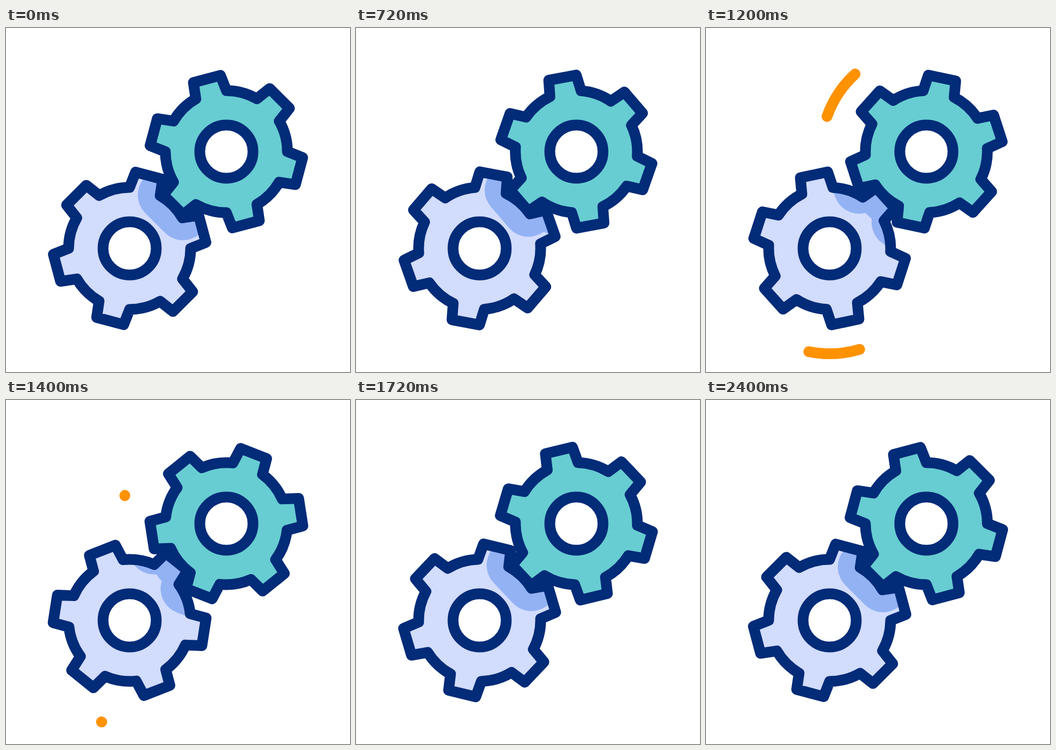
An HTML page without scripts that plays this animation: 640 px wide and 640 px high, repeating every 2.52 s.

```html
<!DOCTYPE html>
<html lang="en">
<head>
<meta charset="utf-8">
<title>Gears</title>
<style>
  @property --turn { syntax: "<number>"; inherits: true; initial-value: 15; }
  @property --head { syntax: "<number>"; inherits: true; initial-value: 0; }
  @property --tail { syntax: "<number>"; inherits: true; initial-value: 0; }

  html, body { margin: 0; height: 100%; overflow: hidden; background: #fff; }

  svg {
    display: block;
    width: 100%;
    height: 100%;
    animation: 2520ms infinite;
    animation-name: turn, head, tail;
    animation-timing-function: cubic-bezier(.73, -.32, .25, 1.3), cubic-bezier(.49, 0, .51, 1), cubic-bezier(.49, 0, .51, 1);
  }

  .line { fill: none; stroke: #022b78; stroke-width: 20; stroke-linejoin: round; }
  .hub { fill: #fff; }
  .shade { fill: #93b2f4; stroke: #93b2f4; stroke-width: 95; stroke-linejoin: round; }

  .cw { transform: rotate(calc(var(--turn) * 1deg)); }
  .ccw { transform: rotate(calc(var(--turn) * -1deg)); }
  /* cancels the lower gear's spin, then follows the upper gear */
  .follow {
    transform: rotate(calc(var(--turn) * -1deg)) translate(180px, -180px) rotate(calc(var(--turn) * -1deg));
  }

  .swoosh {
    fill: none;
    stroke: #ff9200;
    stroke-width: 20;
    stroke-linecap: round;
    stroke-dasharray: calc((var(--head) - var(--tail) + .1) * 1px) 300px;
    stroke-dashoffset: calc(var(--tail) * -1px);
    visibility: hidden;
    animation: show 2520ms step-end infinite;
  }

  /* a third of a turn; the easing winds up first and overshoots */
  @keyframes turn {
    0%, 9.524% { --turn: 15; }
    95.238%, 100% { --turn: 135; }
  }
  @keyframes head {
    0%, 31.746% { --head: 0; }
    50.794%, 100% { --head: 99.9; }
  }
  @keyframes tail {
    0%, 36.508% { --tail: 0; }
    55.556%, 100% { --tail: 99.8; }
  }
  @keyframes show {
    0% { visibility: hidden; }
    31.74% { visibility: visible; }
    57.14%, 100% { visibility: hidden; }
  }
</style>
</head>
<body>
<svg viewBox="0 0 640 640">
  <defs>
    <path id="gear" d="M-29.5-109.6L-26-140L26-140L29.5-109.6
      A113.5 113.5 0 0 1 80.2-80.3L108.2-92.5L134.2-47.5L109.7-29.3
      A113.5 113.5 0 0 1 109.7 29.3L134.2 47.5L108.2 92.5L80.2 80.3
      A113.5 113.5 0 0 1 29.5 109.6L26 140L-26 140L-29.5 109.6
      A113.5 113.5 0 0 1 -80.2 80.3L-108.2 92.5L-134.2 47.5L-109.7 29.3
      A113.5 113.5 0 0 1 -109.7-29.3L-134.2-47.5L-108.2-92.5L-80.2-80.3
      A113.5 113.5 0 0 1 -29.5-109.6Z"/>
    <path id="arc" pathLength="100" d="M67-184.2A196 196 0 0 0 -189-52"/>
    <clipPath id="inside"><use href="#gear"/></clipPath>
  </defs>

  <g transform="translate(230 410)">
    <g class="cw">
      <use href="#gear" fill="#d2dcfd"/>
      <g clip-path="url(#inside)">
        <g class="follow"><use href="#gear" class="shade"/></g>
      </g>
      <use href="#gear" class="line"/>
    </g>
    <circle class="line hub" r="49.5"/>
    <use href="#arc" class="swoosh" transform="rotate(120.9) scale(-1 1)"/>
  </g>

  <g transform="translate(410 230)">
    <g class="ccw">
      <use href="#gear" fill="#67cdd2"/>
      <use href="#gear" class="line"/>
    </g>
    <circle class="line hub" r="49.5"/>
    <use href="#arc" class="swoosh"/>
  </g>
</svg>
</body>
</html>
```
